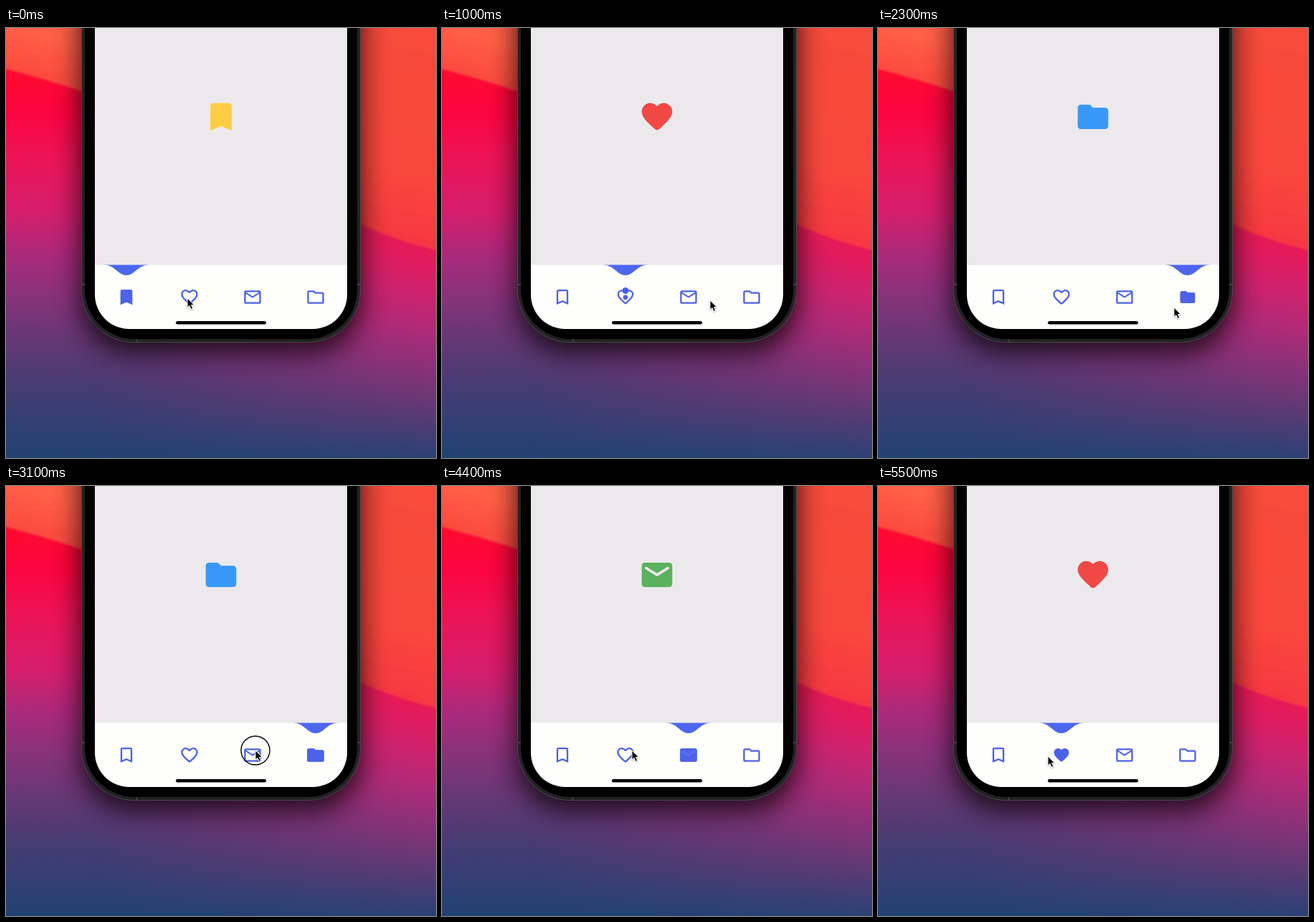
These frames come from a looping animation (600x600 px, 5600 ms). An HTML page:

```html
<!DOCTYPE html>
<html lang="en">
<head>
<meta charset="utf-8">
<title>Tab bar with falling drop</title>
<style>
  html, body { margin: 0; width: 100%; height: 100%; overflow: hidden; background: #2a4174; }
  svg { display: block; width: 100vw; height: 100vh; }
</style>
</head>
<body>
<svg viewBox="0 0 600 600" xmlns="http://www.w3.org/2000/svg">
  <defs>
    <linearGradient id="left" gradientUnits="userSpaceOnUse" x1="0" y1="0" x2="0" y2="600">
      <stop offset=".09" stop-color="#ff0a2c"/>
      <stop offset=".2" stop-color="#fb0542"/>
      <stop offset=".3" stop-color="#ec1457"/>
      <stop offset=".43" stop-color="#d41e6c"/>
      <stop offset=".53" stop-color="#a92a7b"/>
      <stop offset=".63" stop-color="#843379"/>
      <stop offset=".73" stop-color="#633874"/>
      <stop offset=".84" stop-color="#443c73"/>
      <stop offset="1" stop-color="#214273"/>
    </linearGradient>
    <linearGradient id="right" gradientUnits="userSpaceOnUse" x1="0" y1="0" x2="0" y2="600">
      <stop offset=".46" stop-color="#f0174e"/>
      <stop offset=".54" stop-color="#e41a5c"/>
      <stop offset=".62" stop-color="#d0226e"/>
      <stop offset=".7" stop-color="#b32a78"/>
      <stop offset=".78" stop-color="#8f3078"/>
      <stop offset=".87" stop-color="#683874"/>
      <stop offset="1" stop-color="#2b4174"/>
    </linearGradient>
    <linearGradient id="across"><stop offset=".2" stop-color="#000"/><stop offset="1" stop-color="#fff"/></linearGradient>
    <linearGradient id="cornerFill" gradientUnits="userSpaceOnUse" x1="20" y1="0" x2="0" y2="75">
      <stop offset="0" stop-color="#ff5f46"/><stop offset="1" stop-color="#f9443e"/>
    </linearGradient>
    <linearGradient id="ridgeFill" gradientUnits="userSpaceOnUse" x1="560" y1="0" x2="500" y2="300">
      <stop offset="0" stop-color="#f74b3a"/><stop offset=".65" stop-color="#f9463c"/><stop offset="1" stop-color="#f63643"/>
    </linearGradient>
    <mask id="fadeRight"><rect width="600" height="600" fill="url(#across)"/></mask>
    <filter id="soft" x="-30%" y="-30%" width="160%" height="160%"><feGaussianBlur stdDeviation="18"/></filter>
    <filter id="edge"><feGaussianBlur stdDeviation="1.500"/></filter>
    <filter id="cursorShadow" x="-50%" y="-50%" width="200%" height="200%">
      <feDropShadow dx="0" dy="1" stdDeviation="1" flood-opacity=".35"/>
    </filter>
    <clipPath id="screen"><rect x="124" y="-200" width="352" height="620" rx="48"/></clipPath>
  </defs>

  <rect width="600" height="600" fill="url(#left)"/>
  <rect width="600" height="600" fill="url(#right)" mask="url(#fadeRight)"/>
  <path d="M-5-5H300V130Q190 116 105 88Q50 70-5 56Z" fill="url(#cornerFill)" filter="url(#edge)"/>
  <path d="M300-5H605V311Q545 297 497 275Q400 232 300 200Z" fill="url(#ridgeFill)" filter="url(#edge)"/>

  <rect x="103" y="-200" width="394" height="654" rx="73" opacity=".74" filter="url(#soft)"/>
  <rect x="105.500" y="-200" width="389" height="638.500" rx="73" fill="#222224" stroke="#48484b"/>
  <path d="M105 358h5M490 358h5M182.500 434v4" stroke="#404042" stroke-width="2"/>
  <rect x="110" y="-200" width="380" height="634" rx="69"/>

  <g clip-path="url(#screen)">
    <rect x="123" width="354" height="331" fill="#ebe9ec"/>
    <g id="pages"></g>
    <rect x="123" y="330.500" width="354" height="92" fill="#fefefc"/>
    <path id="notch" fill="#4c66ee"/>
    <g id="tabs" fill="#4c62e8"></g>
    <circle id="drop" r="4.500" fill="#4c62e8"/>
    <rect x="237" y="409" width="126" height="4.500" rx="2.250"/>
  </g>

  <circle id="ring" r="20" fill="none" stroke="#000" stroke-width="1.400"/>
  <path id="cursor" d="M0 0V13.200L3 10.400L5.200 15.400L7.700 14.300L5.500 9.500H9.600Z"
        stroke="#fff" stroke-width="1" stroke-linejoin="round" filter="url(#cursorShadow)"/>
</svg>

<script>
const LOOP = 5600, STEP = 100, PAGE_WIDTH = 352, BAR_TOP = 330.5;
const $ = id => document.getElementById(id);
const tabX = i => 168 + 88 * i;
const clamp = v => Math.min(1, Math.max(0, v));
const progress = (t, from, to) => clamp((t - from) / (to - from));
const ease = p => (1 - Math.cos(Math.PI * p)) / 2;
const pulse = p => Math.sin(Math.PI * p);
const mix = (a, b, p) => a + (b - a) * p;

const bookmark = 'M17 3H7c-1.100 0-2 .9-2 2v16l7-3 7 3V5c0-1.100-.9-2-2-2z';
const heart = 'M13.350 20.130c-.76.69-1.930.69-2.690-.01l-.11-.1C5.300 15.270 1.870 12.160 2 8.280c.06-1.700.93-3.330 2.340-4.290 2.640-1.800 5.900-.96 7.660 1.100 1.760-2.060 5.020-2.910 7.660-1.100 1.410.96 2.280 2.590 2.340 4.290.14 3.880-3.300 6.990-8.550 11.760z';
const envelope = 'M20 4H4c-1.100 0-2 .9-2 2v12c0 1.100.9 2 2 2h16c1.100 0 2-.9 2-2V6c0-1.100-.9-2-2-2z';
const folder = 'M10 4H4c-1.100 0-2 .9-2 2v12c0 1.100.9 2 2 2h16c1.100 0 2-.9 2-2V8c0-1.100-.9-2-2-2h-8z';

const icons = [
  { color: '#ffcd43', solid: bookmark, line: bookmark + 'M17 18l-5-2.180L7 18V5h10z' },
  { color: '#ef4845', solid: heart,
    line: heart + 'M12 18.650C7.140 14.240 4 11.390 4 8.500 4 6.500 5.500 5 7.500 5c1.540 0 3.040.99 3.570 2.360h1.870C13.460 5.990 14.960 5 16.500 5c2 0 3.500 1.500 3.500 3.500 0 2.890-3.140 5.740-8 10.150z' },
  { color: '#5ab15e',
    solid: envelope + 'M19.600 8.250l-7.070 4.420c-.32.2-.74.2-1.060 0L4.400 8.250c-.25-.16-.4-.43-.4-.72 0-.67.73-1.070 1.300-.72L12 11l6.700-4.190c.57-.35 1.300.05 1.300.72 0 .29-.15.56-.4.72z',
    line: envelope + 'M20 6l-8 5-8-5zM20 18H4V8l8 5 8-5z' },
  { color: '#3898f5', solid: folder, line: folder + 'M9.170 6l2 2H20v10H4V6z' }
];

const placed = (x, y, scale) => `translate(${x} ${y}) scale(${scale}) translate(-12 -12)`;
const shape = (d, extra = '') => `<path d="${d}" fill-rule="evenodd" ${extra}/>`;

$('pages').innerHTML = icons.map(icon => shape(icon.solid, `fill="${icon.color}"`)).join('');
$('tabs').innerHTML = icons.map((icon, i) => `<g>
    <clipPath id="fill${i}"><circle cx="12" cy="12.300"/></clipPath>
    ${shape(icon.line)}${shape(icon.solid, `clip-path="url(#fill${i})"`)}
  </g>`).join('');
const pages = [...$('pages').children];
const tabs = [...$('tabs').children];
const fills = icons.map((_, i) => $('fill' + i).firstElementChild);

// Tab changes: start time, previous tab, next tab.
const changes = [
  { start: -2000, from: 0, to: 0 },
  { start: 300, from: 0, to: 1 },
  { start: 1400, from: 1, to: 3 },
  { start: 3100, from: 3, to: 2 },
  { start: 4600, from: 2, to: 1 }
];

// Pointer stops: time, x, y.
const stops = [
  [0, 253, 377], [600, 253, 377], [1000, 374, 380], [1250, 430, 373], [1900, 430, 373],
  [2300, 413, 390], [2800, 348, 369], [4000, 348, 369], [4400, 265, 369],
  [4500, 256, 370], [5100, 256, 370], [5500, 237, 377], [LOOP, 237, 377]
];

function pointerAt(t) {
  const k = stops.findIndex(s => s[0] > t);
  const [t0, x0, y0] = stops[k - 1], [t1, x1, y1] = stops[k];
  const p = progress(t, t0, t1);
  return [mix(x0, x1, p), mix(y0, y1, p)];
}

function drawNotch(x, sag) {
  const w = mix(32, 27, sag), wing = w * .5, bottom = BAR_TOP + mix(14.5, 17, sag);
  $('notch').setAttribute('d', `M${x - w} ${BAR_TOP}h${2 * w}
    C${x + wing} ${BAR_TOP} ${x + 11.5} ${bottom} ${x} ${bottom}
    C${x - 11.5} ${bottom} ${x - wing} ${BAR_TOP} ${x - w} ${BAR_TOP}Z`);
}

function draw(t) {
  const change = changes.findLast(c => c.start <= t);
  const { from, to } = change, age = t - change.start;

  const page = mix(from, to, ease(progress(age, 0, 600)));
  pages.forEach((el, i) =>
    el.setAttribute('transform', placed(300 + PAGE_WIDTH * (i - page), 124, 2.13)));

  drawNotch(mix(tabX(from), tabX(to), ease(progress(age, 0, 450))), pulse(progress(age, 350, 650)));

  // The drop squeezes the icon it lands in, then fills it from the middle.
  const squeeze = .12 * pulse(progress(age, 650, 1150));
  tabs.forEach((tab, i) =>
    tab.setAttribute('transform', placed(tabX(i), 375.5, 1.17 * (i === to ? 1 - squeeze : 1))));
  fills.forEach((circle, i) => {
    const radius = i === to ? Math.max(0, (age - 630) * .043)
      : i === from ? 15 * (1 - progress(age, 0, 200)) : 0;
    circle.setAttribute('r', Math.min(radius, 16));
  });

  const falling = age > 520 && age < 790;
  $('drop').setAttribute('visibility', falling ? 'visible' : 'hidden');
  $('drop').setAttribute('cx', tabX(to));
  $('drop').setAttribute('cy', mix(345, 376, progress(age, 520, 780)));

  const [x, y] = pointerAt(t);
  const pressed = changes.some(c => t >= c.start - 100 && t < c.start + 200);
  $('cursor').setAttribute('transform', `translate(${x} ${y})`);
  $('ring').setAttribute('transform', `translate(${x} ${y})`);
  $('ring').setAttribute('visibility', pressed ? 'visible' : 'hidden');
}

const began = performance.now();
function tick() {
  const t = (performance.now() - began) % LOOP;
  draw(Math.floor(t / STEP) * STEP);
  requestAnimationFrame(tick);
}
tick();
</script>
</body>
</html>
```
